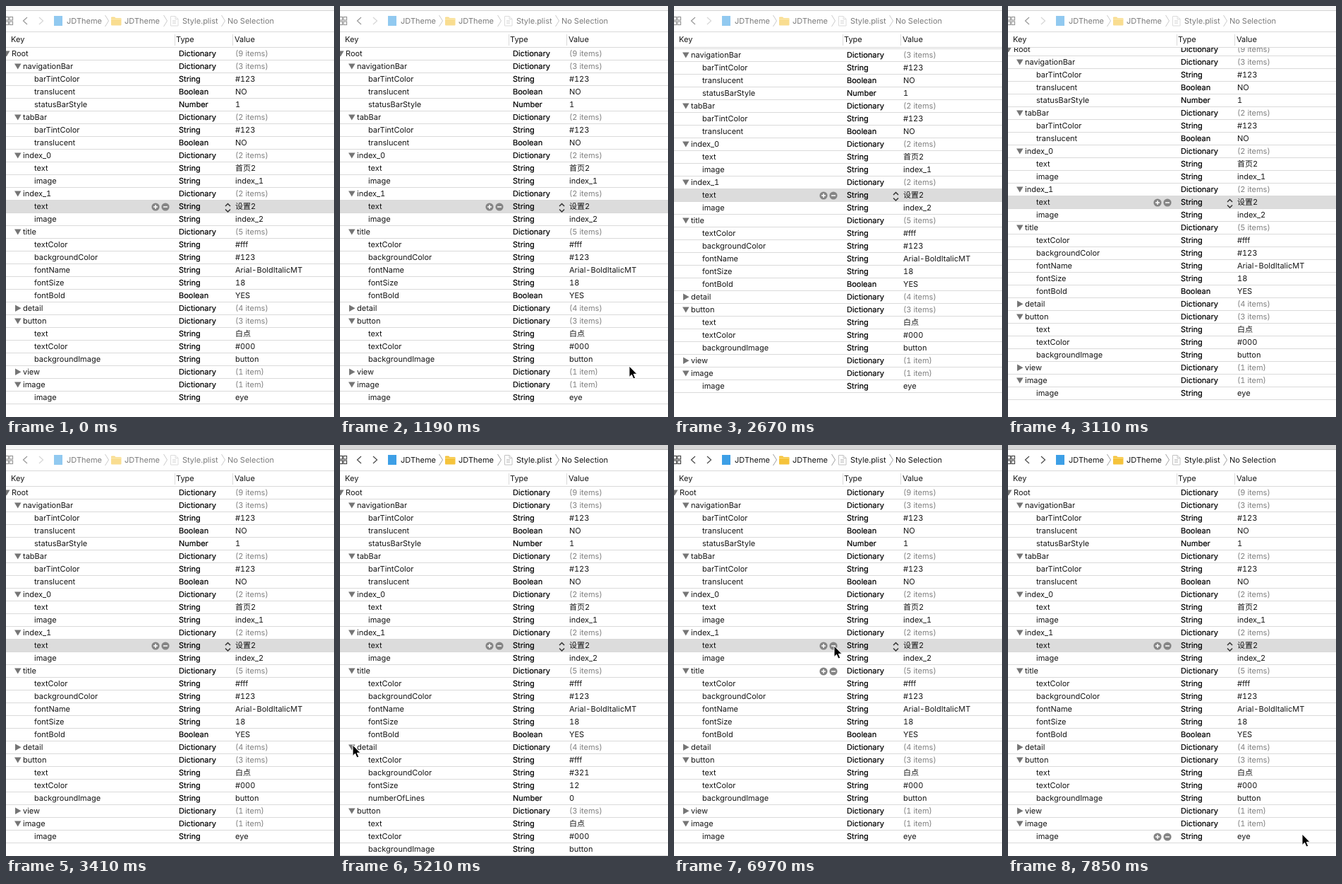
Write an HTML page that moves like this. It is 465 px wide and 581 px high and loops after 7.99 s.

```html
<!DOCTYPE html>
<html lang="en">
<head>
<meta charset="utf-8">
<title>Property list editor</title>
<style>
html, body { margin: 0; width: 100%; height: 100%; overflow: hidden; background: #fff; }
svg { display: block; width: 100vw; height: 100vh; font: 11px Inter, "Noto Sans CJK SC", "Noto Sans CJK", sans-serif;
  font-variant-numeric: tabular-nums; text-rendering: geometricPrecision; }
text { fill: #161616; white-space: pre; }
.type { fill: #000; stroke: #000; stroke-width: .2; }
.count { fill: #808080; }
.line { stroke: #dadada; }
.arrow { fill: #757575; }
.icon { fill: none; stroke: #4a4a4a; stroke-width: 1.2; }
.stepper { fill: none; stroke: #333; stroke-width: 1.5; }
.crumb { fill: none; stroke: #a0a0a0; }
#strip { fill: #d6d6d6; stroke: #bcbcbc; }
.inactive #strip { fill: #f6f6f6; stroke: #d4d4d4; }
.inactive #jumpbar { opacity: .56; }
.inactive #forward { opacity: .4; }
</style>
</head>
<body>
<svg id="stage" viewBox="0 0 465 581">
  <defs>
    <clipPath id="body"><rect y="59" width="465" height="522"/></clipPath>
    <rect id="tile" width="4.5" height="4.5"/>
    <path id="crumb" class="crumb" d="M.5 13l5 8-5 8"/>
    <g id="buttons">
      <circle cx="212" r="5.6" fill="#858585"/>
      <circle cx="226" r="5.6" fill="#858585"/>
      <path d="M209 0h6M212-3v6M223 0h6" stroke="#fff" stroke-width="1.5"/>
    </g>
  </defs>
  <rect width="465" height="581" fill="#fff"/>

  <g clip-path="url(#body)"><g id="scroller">
    <g id="collapsed"></g>
    <g id="expanded"></g>
    <use id="hover" href="#buttons"/>
  </g></g>

  <rect id="strip" x="-1" y="-1" width="467" height="7.5"/>
  <path class="line" d="M0 36.5h465M0 58.5h465M239.5 40v16M321.5 40v16"/>
  <text x="7" y="51">Key</text>
  <text x="241" y="51">Type</text>
  <text x="324" y="51">Value</text>

  <g id="jumpbar">
    <g class="icon">
      <use href="#tile" x="-1" y="15.5"/><use href="#tile" x="5" y="15.5"/>
      <use href="#tile" x="-1" y="22"/><use href="#tile" x="5" y="22"/>
      <path d="M30 16l-5.5 5 5.5 5"/>
      <path id="forward" d="M47 16l5.5 5-5.5 5"/>
    </g>
    <rect x="68" y="14" width="12" height="14" fill="#3d9fe6"/>
    <path d="M149 16.5q0-1 1-1h4l1.5 1.500h7q1 0 1 1v8.500q0 1-1 1h-12.500q-1 0-1-1z" fill="#f5c33b"/>
    <path d="M149 18.5h14.500" stroke="#fbdc7c"/>
    <path d="M233.5 14.500h6.500l4 4v9.500h-10.500zM240 14.500v4h4M236 20.500h5M236 22.500h5M236 24.500h5" fill="#fff" stroke="#c2c2c2"/>
    <use href="#crumb" x="140"/><use href="#crumb" x="223"/><use href="#crumb" x="305"/>
    <text x="86" y="25">JDTheme</text>
    <text x="168" y="25">JDTheme</text>
    <text x="250" y="25">Style.plist</text>
    <text x="314" y="25">No Selection</text>
  </g>

  <path id="cursor" d="M0 0V15.5L3.5 12.300 6 18 8.700 16.800 6.300 11.300H11z" fill="#000" stroke="#fff" stroke-linejoin="round"/>
</svg>

<script>
const LOOP = 7990, TICK = 148; // movement advances once per tick
const ROW = 18, TOP = 58, SELECTED = 12;
const ACTIVATE = 5210, HOVER = 5500, COLLAPSE = 5950;
const $ = id => document.getElementById(id);

// Leading spaces give the depth; a dictionary marked "+" is closed.
const before = `Root|Dictionary|(9 items)
 navigationBar|Dictionary|(3 items)
  barTintColor|String|#123
  translucent|Boolean|NO
  statusBarStyle|Number|1
 tabBar|Dictionary|(2 items)
  barTintColor|String|#123
  translucent|Boolean|NO
 index_0|Dictionary|(2 items)
  text|String|首页2
  image|String|index_1
 index_1|Dictionary|(2 items)
  text|String|设置2
  image|String|index_2
 title|Dictionary|(5 items)
  textColor|String|#fff
  backgroundColor|String|#123
  fontName|String|Arial-BoldItalicMT
  fontSize|String|18
  fontBold|Boolean|YES`;
const closedDetail = ` detail|Dictionary|(4 items)|+`;
const openDetail = ` detail|Dictionary|(4 items)
  textColor|String|#fff
  backgroundColor|String|#321
  fontSize|String|12
  numberOfLines|Number|0`;
const after = ` button|Dictionary|(3 items)
  text|String|白点
  textColor|String|#000
  backgroundImage|String|button
 view|Dictionary|(1 item)|+
 image|Dictionary|(1 item)
  image|String|eye`;

function rowMarkup(line, index) {
  const [name, type, value, closed] = line.split('|');
  const key = name.trim(), x = 8 + 16 * (name.length - key.length);
  const isDictionary = type === 'Dictionary';
  const triangle = closed ? `M${x - 11} 4.5v9.5l8.5-4.75z` : `M${x - 12} 5.5h9.5l-4.75 8z`;
  return `<g transform="translate(0 ${TOP + index * ROW})">
    ${index === SELECTED ? `<rect y="1" width="465" height="17" fill="#dcdcdc"/>
      <use href="#buttons" y="10"/>
      <path class="stepper" d="M311 9l3.5-3.5 3.5 3.5M311 13.5l3.5 3.5 3.5-3.5"/>` : ''}
    <path class="line" d="M0 18.5h465"/>
    ${isDictionary ? `<path class="arrow" d="${triangle}"/>` : ''}
    <text x="${x}" y="13">${key}</text>
    <text class="type" x="245" y="13">${type}</text>
    <text class="${isDictionary ? 'count' : ''}" x="325" y="13">${value}</text></g>`;
}
const table = (...parts) => parts.join('\n').split('\n').map(rowMarkup).join('');
$('collapsed').innerHTML = table(before, closedDetail, after);
$('expanded').innerHTML = table(before, openDetail, after);

// Key points, timed in ticks: a small pull down, then a swipe that springs back.
const scrollPath = [[13.2, 0], [15, 5], [16.2, 5], [18, -16], [23, 0]];
// The pointer peeks in, opens the detail row, then roams up and away.
const peekPath = [[7, 413, 550], [8, 410, 509]];
const roamPath = [[26, 150, 436], [32, 18, 423], [40, 17, 427], [43, 150, 70],
  [46, 225, 320], [47, 227, 284], [48, 232, 266], [52, 408, 546], [53, 417, 550]];

// Eased position on a path, held at both ends.
function follow(path, tick) {
  const next = path.findIndex(point => point[0] > tick);
  if (next < 1) return path.at(next).slice(1);
  const [start, ...from] = path[next - 1], [end, ...to] = path[next];
  const u = (tick - start) / (end - start), ease = u * u * (3 - 2 * u);
  return from.map((value, i) => Math.round(value + (to[i] - value) * ease));
}
const show = (element, visible) => element.style.display = visible ? '' : 'none';
const move = (element, x, y) => element.setAttribute('transform', `translate(${x} ${y})`);

function draw(now) {
  const time = now % LOOP, tick = Math.floor(time / TICK);
  const open = time >= ACTIVATE && time < COLLAPSE;
  show($('expanded'), open);
  show($('collapsed'), !open);
  $('stage').classList.toggle('inactive', time < ACTIVATE);
  move($('scroller'), 0, follow(scrollPath, tick)[0]);

  const roaming = tick >= 26;
  show($('cursor'), roaming || tick >= 7 && tick < 11);
  move($('cursor'), ...follow(roaming ? roamPath : peekPath, tick));

  // Row buttons trail the pointer by one tick.
  const row = Math.floor((follow(roamPath, tick - 1)[1] - TOP) / ROW);
  show($('hover'), time >= HOVER);
  move($('hover'), 0, TOP + row * ROW + 10);
  requestAnimationFrame(draw);
}
requestAnimationFrame(draw);
</script>
</body>
</html>
```
